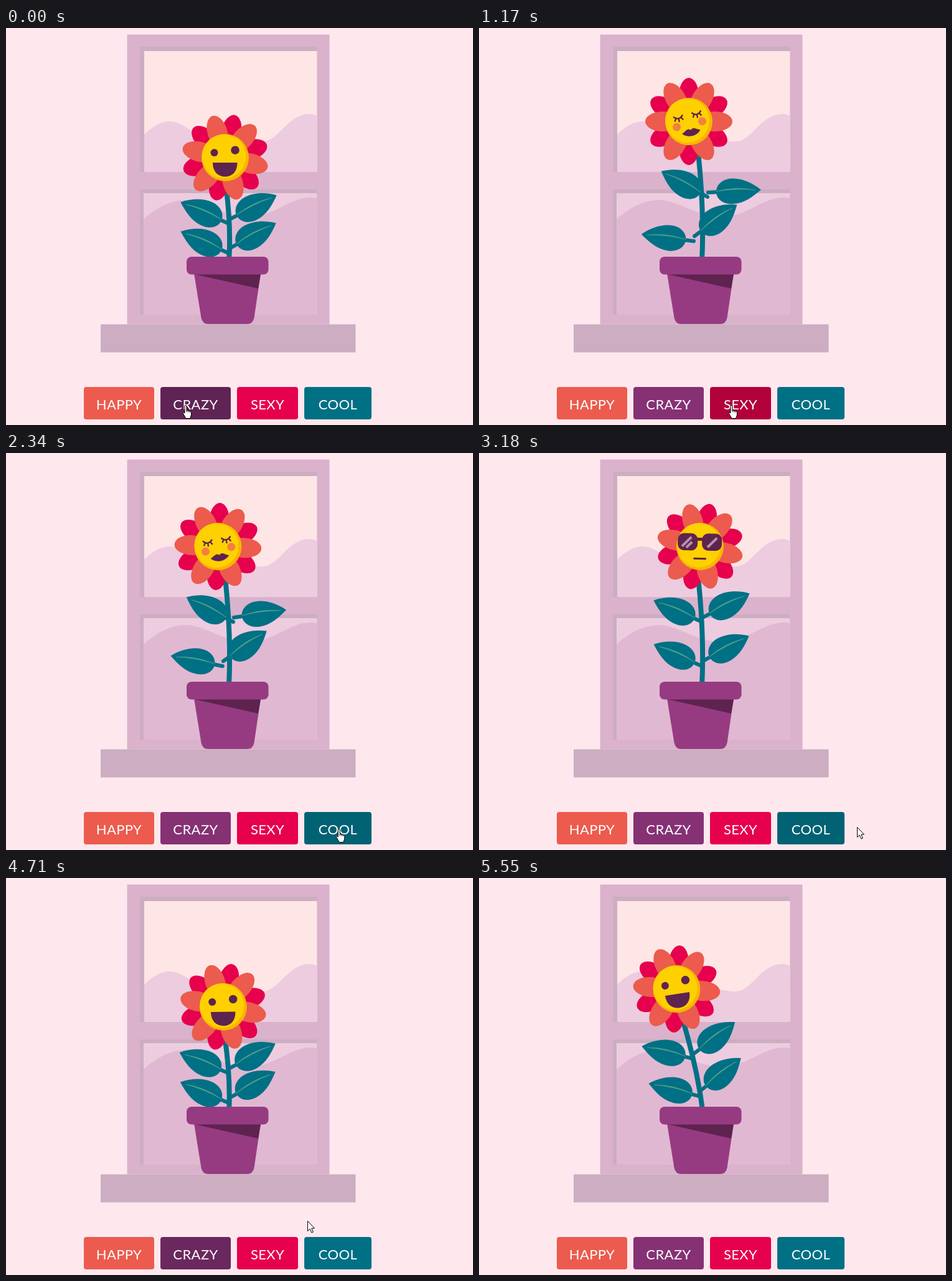
These frames come from a looping animation (750x637 px, 5.65 s). An HTML page:

```html
<!DOCTYPE html>
<html lang="en">
<head>
<meta charset="utf-8">
<title>Flower moods</title>
<style>
  html, body { margin: 0; height: 100%; overflow: hidden; background: #fee8ee; }
  svg { display: block; width: 750px; height: 637px; }
  text { font: 400 22px Lato, sans-serif; letter-spacing: .4px; fill: #fff; text-anchor: middle; }
  .dark { fill: #5e234f; }
  .line { fill: none; stroke: #5e234f; stroke-linecap: round; }
  .cursor { fill: #fff; stroke: #000; stroke-linejoin: round; }
</style>
</head>
<body>
<svg viewBox="0 0 750 637">
  <defs>
    <g id="leaf">
      <path d="M-14 0H0" stroke="#007085" stroke-width="6" stroke-linecap="round"/>
      <path fill="#007085" d="M-85 0C-70 -14 -52 -21 -38 -20.5C-22 -20 -13 -10 -13 0C-13 12 -24 21 -40 20.5C-58 20 -72 10 -85 0Z"/>
      <path fill="#58a48a" stroke="#58a48a" stroke-width=".5" d="M-76 0Q-45 -8 -13 -1Q-45 -5 -76 0Z"/>
    </g>
    <path id="eye" d="M-7 -12Q0 -4.5 7 -12M-4.5 -9l-2 3.5M0 -8v4.5M4.5 -9l2 3.5"/>
  </defs>

  <g id="window">
    <path fill="#dab2cb" d="M194.5 10.5H519.5V475.5H194.5Z"/>
    <path fill="#ccadc1" d="M215 30H499.5V231H215ZM215 259H499.5V460H215Z"/>
    <path fill="#fde6e5" d="M222 37H499.5V231H222Z"/>
    <path fill="#edcce0" d="M222 171C236 157 250 150 262 150C290 150 300 178 340 176S392 182 412 182C438 182 452 138 487 138Q494 138 499.5 141V231H222ZM221 265H499.5V460H221Z"/>
    <path fill="#e1b8d2" d="M221 307C238 291 262 276 290 276S350 303 390 303S455 272 490 272L499.5 273V460H221Z"/>
    <path fill="#ccadc1" d="M152 475.5H561.5V520.5H152Z"/>
  </g>

  <g id="plant">
    <path id="stem" fill="none" stroke="#007085" stroke-width="8"/>
    <g id="leaves"></g>
    <g id="head">
      <g id="petals"></g>
      <circle r="38" fill="#f8b600"/>
      <circle cx="-2" cy="-2" r="35.5" fill="#ffd000"/>
      <g id="crazy" class="dark">
        <circle cx="-17.5" cy="-8" r="6"/>
        <circle cx="16" cy="-12" r="6.8"/>
        <path d="M-20 8H19.5C19.5 23 11 30.5 0 30.5S-20 23 -20 8Z"/>
      </g>
      <g id="sexy">
        <g class="line" stroke-width="2.4">
          <use href="#eye" x="-15"/>
          <use href="#eye" x="15"/>
        </g>
        <g fill="#f47f3f">
          <circle cx="-21" cy="4.5" r="6.5"/>
          <circle cx="21" cy="4.5" r="6.5"/>
        </g>
        <path class="dark" d="M-15 17C-10 15 -7 12 -4 12Q-2 12 0 14Q2 12 4 12C7 12 10 15 15 17C8 26 -8 26 -15 17Z"/>
      </g>
      <g id="cool">
        <g class="dark">
          <rect x="-36" y="-21" width="32" height="27.5" rx="10"/>
          <rect x="3" y="-21" width="32" height="27.5" rx="10"/>
          <path d="M-8 -14H7V-9H-8Z"/>
        </g>
        <path d="M-29 0L-14 -15M-22 2L-13 -7M12 1L27 -14" fill="none" stroke="#b591aa" stroke-width="4"/>
        <path class="line" stroke-width="3" d="M-9 19.5H9"/>
      </g>
    </g>
  </g>

  <g id="pot">
    <path fill="#963b82" d="M302 394H409L398.5 465Q396.5 475 387 475H325Q315.5 475 313.5 465Z"/>
    <path class="dark" d="M302 395H409L405 418Z"/>
    <rect x="290" y="367" width="131.5" height="28.5" rx="8" fill="#963b82"/>
  </g>

  <g id="buttons"></g>
  <path id="hand" class="cursor" d="M4.5 .5Q6 .5 6 2V8L11.5 9.5Q13.5 10 13.5 12V16L11.5 21.5H5L1 14.5Q-.5 12 1 11.5L3 13V2Q3 .5 4.5 .5ZM6 8V11M8.5 9V11.5M11 9.5V12"/>
  <path id="arrow" class="cursor" d="M.5 .5V16.5L4.2 13L6.8 19L9.3 18L6.8 12H11.5Z"/>
</svg>
<script>
const LOOP = 5650, STEP = 30;
const $ = id => document.getElementById(id);
const add = (parent, tag, attrs) => {
  const el = document.createElementNS('http://www.w3.org/2000/svg', tag);
  for (const k in attrs) el.setAttribute(k, attrs[k]);
  return $(parent).appendChild(el);
};
const place = (el, x, y, more = '') => el.setAttribute('transform', `translate(${x} ${y}) ${more}`);
const show = (id, on) => $(id).style.display = on ? '' : 'none';
const clamp = v => Math.min(1, Math.max(0, v));
const held = (list, t) => list.findLast(k => k[0] <= t);

const moods = [[0, 'crazy'], [840, 'sexy'], [2600, 'cool'], [3570, 'sexy'], [4410, 'crazy']];

// Each hop is [take-off, side]; side 0 stands up and stays
const hops = [[0, -1], [360, 1], [690, 0], [4410, -1], [4713, 1], [5165, -1], [5674, 1]];

function hop(t) {
  const [start, side] = held(hops, t);
  if (!side) return { height: t > 4000 ? 1 : clamp((t - start) / 200), lean: 0 };
  const [end] = hops.find(h => h[0] > t);
  const height = Math.sin(Math.PI * ((t - start) / (end - start)) ** .8);
  return { height, lean: side * 15 * height ** .7 };
}

// Waypoints [time, x, y] with eased travel between them
const route = [[200, 284, 605], [660, 382, 605], [1410, 407, 605], [1700, 407, 605], [2300, 530, 603],
  [3030, 562, 603], [3180, 607, 600], [3450, 430, 600], [3720, 430, 600], [4110, 349, 595],
  [4560, 332, 598], [4710, 484, 550], [4860, 629, 595]];

function cursorAt(t) {
  const [t0, x, y] = held(route, t) ?? route[0];
  const [t1, x1, y1] = route.find(p => p[0] > t) ?? route.at(-1);
  const p = t1 > t0 ? (t - t0) / (t1 - t0) : 0, e = p * p * (3 - 2 * p);
  return [x + (x1 - x) * e, y + (y1 - y) * e];
}

// A button darkens while hovered; hovers are [from, to]
const buttons = [
  ['HAPPY', 125, 113, '#ec5b4d', '#ec5b4d', []],
  ['CRAZY', 248, 113, '#863174', '#5f2454', [[-300, 660], [4150, 4650]]],
  ['SEXY', 371, 98, '#e6004d', '#b2003b', [[700, 1960], [3330, 4130]]],
  ['COOL', 479, 108, '#007085', '#006273', [[2000, 3190]]],
].map(([label, x, width, base, dark, hovers]) => {
  const el = add('buttons', 'rect', { x, y: 576, width, height: 52, rx: 4 });
  add('buttons', 'text', { x: x + width / 2, y: 612 }).textContent = label;
  return { el, base, dark, hovers };
});
const shade = (hovers, t) =>
  Math.max(0, ...hovers.map(([from, to]) => clamp((t - from) / 200) * clamp(1 - (t - to) / 200)));

// side: -1 left, 1 right; slide: travel with the sway; out and inn: turn away from and towards the stem
const upper = { drop: 43, slide: -9, out: 24, inn: 5 };
const lower = { drop: 19.5, slide: 13, out: 17, inn: 8 };
const leaves = [
  { ...upper, x: 358, y: 271, side: -1, turn: 24 },
  { ...upper, x: 359, y: 264, side: 1, turn: -27 },
  { ...lower, x: 358, y: 342, side: -1, turn: 24.4 },
  { ...lower, x: 359, y: 334, side: 1, turn: -28.5 },
];
for (const leaf of leaves) leaf.el = add('leaves', 'use', { href: '#leaf' });

for (const [start, fill] of [[43, '#e6004d'], [13, '#ec5b4d']])
  for (let a = start; a < 360 + start; a += 60)
    add('petals', 'ellipse', { cx: 42, rx: 28, ry: 16, fill, transform: `rotate(${a})` });

function draw(t) {
  const [since, mood] = held(moods, t);
  const { height, lean } = hop(t);
  const squash = 1 - height, top = 150 + 58 * squash;
  const sway = mood === 'sexy' ? -Math.sin((t - since - (since < 900 ? 60 : 0)) / 1060 * 2 * Math.PI) : 0;
  const nod = mood === 'cool' ? Math.cos((t - 3180) / 90) : 0;

  $('plant').setAttribute('transform', `rotate(${lean} 358 367)`);
  $('stem').setAttribute('d', `M346 ${top}Q363 ${275 + 25 * squash} 358 374`);
  place($('head'), 352 + 15 * sway + 3 * nod, top, `rotate(${13 * sway + nod - .15 * lean})`);
  for (const l of leaves) {
    const dx = l.slide * sway;
    const turn = l.turn + Math.sign(l.slide) * sway * (dx * l.side > 0 ? l.out : l.inn);
    place(l.el, l.x + dx, l.y + l.drop * squash, `rotate(${turn}) scale(${-l.side} 1)`);
  }
  for (const m of ['crazy', 'sexy', 'cool']) show(m, m === mood);
  for (const b of buttons)
    b.el.style.fill = `color-mix(in srgb, ${b.dark} ${100 * shade(b.hovers, t)}%, ${b.base})`;

  const [x, y] = cursorAt(t), onButtons = x < 587 && y > 576, visible = t < 5010;
  show('hand', visible && onButtons);
  show('arrow', visible && !onButtons);
  place($(onButtons ? 'hand' : 'arrow'), x, y);
}

const begin = performance.now();
function tick() {
  const t = (performance.now() - begin) % LOOP;
  draw(t - t % STEP);
  requestAnimationFrame(tick);
}
tick();
</script>
</body>
</html>
```
